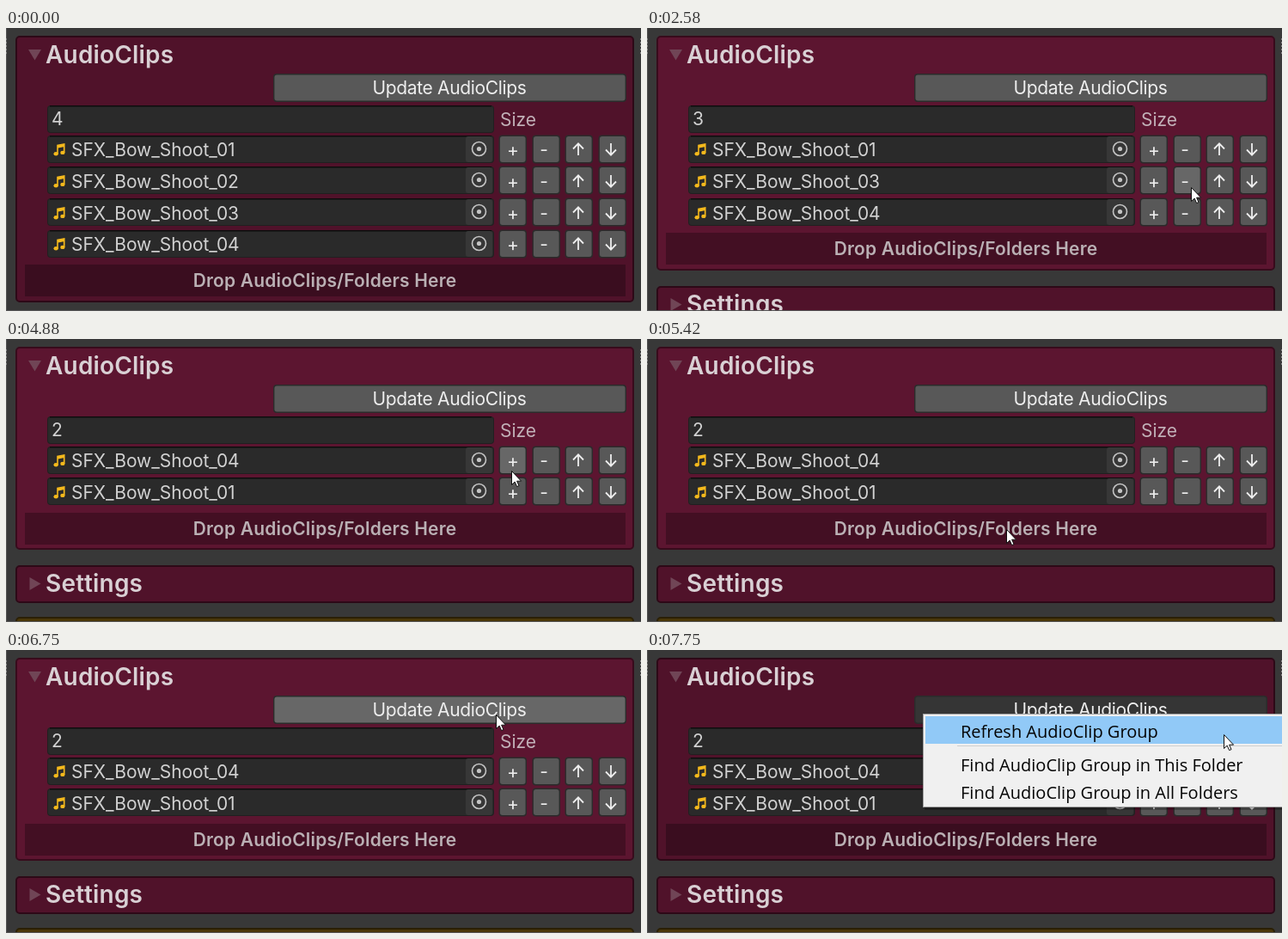
Write an HTML page that moves like this. It is 739x329 px and loops after 8000 ms.

```html
<!DOCTYPE html>
<html lang="en">
<head>
<meta charset="utf-8">
<title>AudioClips list</title>
<style>
html, body { margin: 0; width: 100%; height: 100%; overflow: hidden; background: #383838; }
svg { display: block; width: 739px; height: 329px; }
text { font: 400 21px Inter, "Liberation Sans", sans-serif; font-optical-sizing: none; white-space: pre; }
.title { font-size: 28px; font-weight: 600; fill: #d9d0d4; letter-spacing: .18px; }
.drop { font-weight: 600; fill: #bab0b4; letter-spacing: .17px; }
.clip { fill: #d2d2d2; letter-spacing: -.06px; }
.button { fill: #eee; letter-spacing: -.33px; }
.item { font: 400 20px "Open Sans", "Noto Sans", sans-serif; fill: #050505; }
</style>
</head>
<body>
<svg id="stage" viewBox="0 0 739 329"></svg>
<script>
const LOOP = 8000, ROW = 36.7;
const stage = document.getElementById('stage');

// Pointer moves: start, end, steps, from, control, to, easing
const smooth = p => p * p * (3 - 2 * p);
const easeOut = p => p * (2 - p);
const easeIn = p => p ** 1.6;
const moves = [
  [1050, 1720, 13, [498, 335], [570, 215], [633, 185], easeOut],
  [3930, 4120, 3, [633, 185], [653, 185], [673, 185], easeIn],
  [4640, 5420, 14, [673, 185], [520, 100], [418, 221], smooth],
  [5480, 5540, 2, [418, 221], [432, 223], [446, 225], smooth],
  [5850, 6630, 14, [446, 225], [450, 130], [535, 78], smooth],
  [6690, 6750, 2, [535, 78], [552, 76], [570, 75], easeOut],
  [7410, 7750, 7, [570, 75], [620, 84], [671, 98], smooth]
];
const clicks = [2520, 3390, 4330];
const MENU = 6990;

function pointerAt(t) {
  const move = moves.filter(m => t >= m[0]).pop();
  if (!move) return null;
  const [start, end, steps, a, b, c, ease] = move;
  const step = Math.floor((t - start) / (end - start) * (steps - 1) + 1e-6);
  const p = ease(Math.min(1, (step + 1) / steps));
  return [0, 1].map(i => (1 - p) ** 2 * a[i] + 2 * p * (1 - p) * b[i] + p * p * c[i]);
}

function clipsAt(t) {
  if (t < 2580) return [1, 2, 3, 4];
  if (t < 3450) return [1, 3, 4];
  return t < 4390 ? [1, 4] : [4, 1];
}

const rect = (x, y, w, h, fill, extra = '') =>
  `<rect x="${x}" y="${y}" width="${w}" height="${h}" fill="${fill}" ${extra}/>`;
const path = (d, extra) => `<path d="${d}" ${extra}/>`;
const text = (x, y, s, extra = '') => `<text x="${x}" y="${y}" ${extra}>${s}</text>`;
const centered = 'text-anchor="middle"';

function panel(y, h, fill, edge) {
  return rect(12, y + 1, 718, h - 2, fill, `rx="4" stroke="${edge}" stroke-width="2"`);
}

function heading(y, label, open) {
  const arrow = open ? `M26 ${y - 6}H41L33.5 ${y + 6.5}Z` : `M27.5 ${y - 7}V${y + 8}L40.5 ${y + .5}Z`;
  return path(arrow, 'fill="#704556"') + text(46, y + 10, label, 'class="title"');
}

function field(y, hover) {
  return rect(48, y, 520, 32, hover ? '#656565' : '#202020', 'rx="4"') +
    rect(49, y + 1, 518, 30, '#2a2a2a', 'rx="3"') +
    (hover ? '' : path(`M51 ${y + .75}H565`, 'stroke="#0d0d0d" stroke-width="1.5"'));
}

function button(x, y, w, hover, pressed) {
  const fill = pressed ? '#353535' : hover ? '#676767' : '#585858';
  return rect(x, y, w, 33, '#2b2b2b', 'rx="4"') +
    rect(x + 1.4, y + 1.4, w - 2.8, 30.2, fill, 'rx="3"');
}

function noteIcon(y) {
  return `<g transform="translate(55.5 ${y}) scale(.88)" fill="#f4b91c">
    <ellipse cx="3" cy="14" rx="3" ry="2.5"/><ellipse cx="11.8" cy="12.4" rx="3" ry="2.5"/>
    <path d="M4.2 2L14.8 0V12.5H12.9V4.8L6 6.2V14H4.2Z"/></g>`;
}

function arrowIcon(x, y, dir) {
  return path(`M${x} ${y + 7 * dir}V${y - 6.5 * dir}M${x - 6} ${y - .5 * dir}L${x} ${y - 6.7 * dir}L${x + 6} ${y - .5 * dir}`,
    'fill="none" stroke="#eee" stroke-width="1.8"');
}

function clipRow(i, id, over, pressed) {
  const y = Math.round(124.7 + ROW * i);
  const base = Math.round(149.3 + ROW * i);
  const cell = x => {
    const hover = over(x, y, 32.5, 33);
    return button(x, y - .5, 32.5, hover, hover && pressed);
  };
  return field(y, over(48, y, 520, 32)) +
    rect(535, y + 1, 31, 30, '#373737', 'rx="3"') +
    `<circle cx="550.5" cy="${y + 15.5}" r="8" fill="none" stroke="#c4c4c4" stroke-width="1.6"/>` +
    `<circle cx="550.5" cy="${y + 15.5}" r="2.6" fill="#c4c4c4"/>` +
    noteIcon(base - 15) + text(76, base, 'SFX_Bow_Shoot_0' + id, 'class="clip"') +
    cell(573.5) + text(590, base, '+', centered + ' fill="#eee"') +
    cell(612.5) + text(626, base, '-', centered + ' fill="#eee"') +
    cell(650.5) + arrowIcon(666, base - 8, 1) +
    cell(689.5) + arrowIcon(704, base - 8, -1);
}

function menu(alpha, active) {
  return `<g opacity="${alpha}">` +
    rect(323, 182, 416, 4, '#000', 'opacity=".28"') +
    rect(321, 74, 420, 109, '#a0a0a0') + rect(322, 75, 420, 107, '#f0f0f0') +
    (active ? rect(324, 77, 415, 32, '#91c9f7') : '') +
    rect(361, 111, 378, 1, '#cfcfcf') +
    text(365, 102, 'Refresh AudioClip Group', 'class="item"') +
    text(365, 141, 'Find AudioClip Group in This Folder', 'class="item"') +
    text(365, 173, 'Find AudioClip Group in All Folders', 'class="item"') + '</g>';
}

function pointer([x, y]) {
  return path('M.5 .5V16.5L4.2 13.1L6.6 18.6L9 17.6L6.6 12.2H11.6Z',
    `transform="translate(${Math.round(x)} ${Math.round(y)})" fill="#fff" stroke="#111"`);
}

function draw(t) {
  const tip = pointerAt(t), clips = clipsAt(t), menuOpen = t >= MENU;
  const pressed = clicks.some(c => t >= c && t < c + 60);
  const over = (x, y, w, h) => tip && !menuOpen &&
    tip[0] >= x && tip[0] < x + w && tip[1] >= y && tip[1] < y + h;

  const below = y => Math.round(y + ROW * (clips.length - 2));
  const dim = ['#50122a', '#2d0917'], lit = ['#5c1530', '#380b1c'];
  const bottom = below(245.2), dropY = below(201.6);
  const main = over(11, 9, 720, bottom - 9) ? lit : dim;

  let out = rect(0, 0, 739, 329, '#383838') +
    panel(9, bottom - 9, ...main) + heading(31, 'AudioClips', true) +
    button(311, 53, 411, over(311, 53, 411, 33), menuOpen) +
    text(516, 77, 'Update AudioClips', centered + ' class="button"') +
    field(90, over(48, 90, 520, 32)) +
    text(53, 113, clips.length, 'class="clip"') +
    text(575, 114, 'Size', 'fill="#c2b1b8"');
  clips.forEach((id, i) => out += clipRow(i, id, over, pressed));

  out += rect(22, dropY, 699, 37, '#000', 'opacity=".27"') +
    text(371, dropY + 26, 'Drop AudioClips/Folders Here', centered + ' class="drop"') +
    panel(below(263), 44, ...dim) + heading(below(284), 'Settings', false) +
    panel(below(323), 44, '#4a3708', '#2b2006') +
    rect(0, 0, 1, 329, '#555') + rect(0, 328, 739, 1, '#555') +
    path('M.5 12V32M738.5 12V32', 'stroke="#888" stroke-dasharray="2 2"');

  if (menuOpen) {
    const alpha = Math.min(4, Math.floor((t - MENU) / 60)) / 4;
    out += menu(alpha, t >= 7410);
  }
  return tip ? out + pointer(tip) : out;
}

let shown = '';
const began = performance.now();
function frame() {
  const next = draw((performance.now() - began) % LOOP);
  if (next !== shown) stage.innerHTML = shown = next;
  requestAnimationFrame(frame);
}
frame();
</script>
</body>
</html>
```
